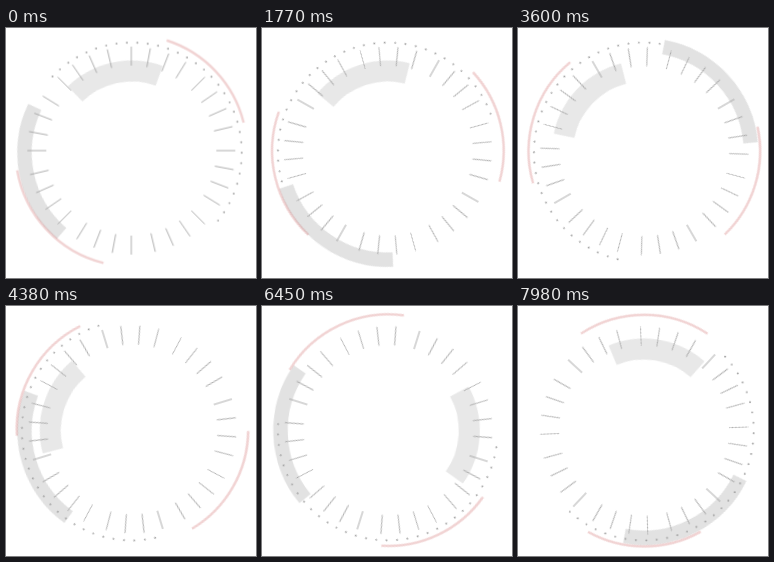
Write an HTML page that moves like this. It is 250 px wide and 250 px high and loops after 8000 ms.

```html
<!DOCTYPE html>
<html lang="en">
<head>
<meta charset="utf-8">
<title>Rotating dial</title>
<style>
  html, body { margin: 0; width: 100%; height: 100%; overflow: hidden; background: #fff; }
  svg { display: block; width: 100vw; height: 100vh; }
  path { fill: none; }
</style>
</head>
<body>
<svg viewBox="0 0 250 250">
  <g transform="translate(125.8 124.5)">
    <path id="outer" stroke="#e2e2e2" stroke-width="14.4"/>
    <path id="inner" stroke="#e8e8e8" stroke-width="21"/>
    <path id="dots" stroke="#a2a2a2" stroke-width="1.9" stroke-linecap="round"
          pathLength="32.02" stroke-dasharray="0 1"/>
  </g>
  <!-- The dial sits slightly off its own pivot, so it wobbles as it turns. -->
  <g transform="translate(125.3 123.8)">
    <g id="dial">
      <g transform="translate(0 -1.2)">
        <g id="pulse">
          <path id="ticks" stroke="#a6a6a6" stroke-width="0.9"/>
          <path id="arcs" stroke="rgb(199 79 79 / 0.25)" stroke-width="2.4"/>
        </g>
      </g>
    </g>
  </g>
</svg>
<script>
const LOOP = 8000, STEP = 30;
const part = id => document.getElementById(id);

// Degrees run clockwise from twelve o'clock.
function point(radius, degrees) {
  const a = degrees * Math.PI / 180;
  return (radius * Math.sin(a)).toFixed(2) + ' ' + (-radius * Math.cos(a)).toFixed(2);
}
const line = (r0, r1, angle) => `M${point(r0, angle)}L${point(r1, angle)}`;
const arc = (r, from, to) => `M${point(r, from)}A${r} ${r} 0 0 1 ${point(r, to)}`;
const shape = (id, d) => part(id).setAttribute('d', d);

// Eight groups of four ticks, with a slightly wider gap between groups.
let ticks = '';
for (let i = 0; i < 32; i++) {
  ticks += line(85, 104, Math.floor(i / 4) * 45 + (i % 4) * 10.55);
}
shape('ticks', ticks);
shape('arcs', arc(115.8, 17.8, 76) + arc(115.8, 193.9, 260.2));
shape('dots', arc(109.9, -46.2, 128.4));
shape('outer', arc(107.2, -37.1, 37.1));
shape('inner', arc(81.4, -31.9, 31.9));

const motions = [];
function move(id, transforms, timing) {
  const motion = part(id).animate({ transform: transforms }, { fill: 'both', ...timing });
  motion.pause();
  motions.push(motion);
}
function spin(id, from, by, timing) {
  move(id, [`rotate(${from}deg)`, `rotate(${from + by}deg)`], timing);
}

spin('dial', 0, 180, { duration: 10800 });
spin('dots', 0, -360, { duration: 10800 });
spin('outer', 259, -1186, { delay: -340, duration: 8430, easing: 'cubic-bezier(.84, 0, .54, 1)' });
spin('inner', -12.2, -360, { delay: 90, duration: 10100, easing: 'cubic-bezier(.825, 0, .365, 1)' });
move('pulse', ['scale(1)', 'scale(.95)', 'scale(1)'], { delay: 4950, duration: 1200 });

const start = performance.now();
function draw() {
  const elapsed = (performance.now() - start) % LOOP;
  const time = Math.floor(elapsed / STEP) * STEP;
  for (const motion of motions) motion.currentTime = time;
  requestAnimationFrame(draw);
}
draw();
</script>
</body>
</html>
```
